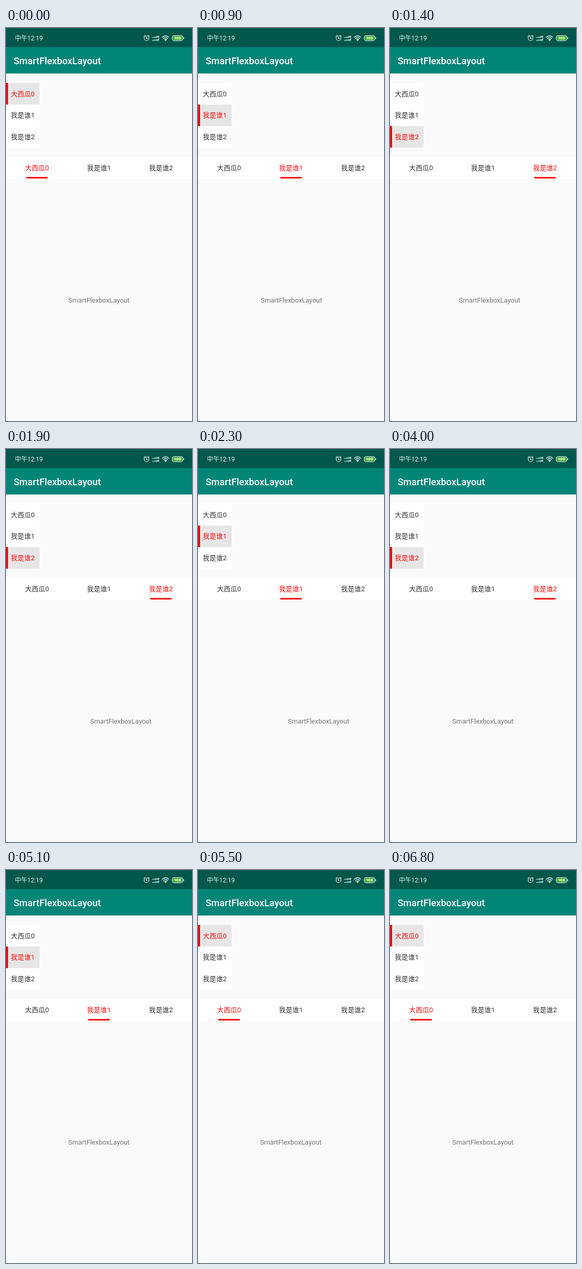
Write an HTML page that moves like this. It is 360 by 760 pixels and loops after 7000 ms.

```html
<!DOCTYPE html>
<html lang="zh-CN">
<head>
<meta charset="utf-8">
<title>SmartFlexboxLayout</title>
<style>
  html, body { margin: 0; width: 100%; height: 100%; overflow: hidden; background: #fafafa; }
  svg { display: block; width: 360px; height: 760px; font: 13px Roboto, "Noto Sans CJK SC", "Noto Sans CJK", sans-serif; }
  .tab { fill: #333; }
  .tab.on { fill: #f81010; }
  .icon { fill: none; stroke: #e8f0ee; stroke-width: 1.2; stroke-linecap: round; }
</style>
</head>
<body>
<svg viewBox="0 0 360 760">
  <rect width="360" height="37" fill="#00574b"/>
  <rect y="37" width="360" height="51" fill="#008577"/>
  <text x="17.3" y="24.3" font-size="12" fill="#e8f0ee">中午12:19</text>
  <text x="14.7" y="70" font-size="18.33" font-weight="500" fill="#fff">SmartFlexboxLayout</text>

  <g class="icon">
    <circle cx="272" cy="20" r="4.5"/>
    <path d="M272 17.5v2.8h2M266.8 16.4l2.3-2.1M277.2 16.4l-2.3-2.1"/>
    <path id="signal" stroke-width="1.7" stroke-linecap="butt"/>
    <path d="M302.6 17.8q6.2-5.6 12.4 0M304.7 20.3q4.1-3.6 8.2 0M306.8 22.6q2-1.7 4 0" stroke-width="1.5"/>
    <rect x="321.6" y="14.6" width="20.8" height="10" rx="4"/>
    <path d="M344 18.3v2.6"/>
  </g>
  <circle cx="308.8" cy="24.1" r="1.1" fill="#e8f0ee"/>
  <rect x="323" y="16" width="18" height="7.2" rx="2.6" fill="#55c030"/>
  <text x="332" y="22.3" font-size="7.5" font-weight="700" text-anchor="middle" fill="#fff">100</text>

  <rect y="106.3" width="65" height="125" fill="#fff"/>
  <rect y="249" width="360" height="43" fill="#fff"/>
  <g id="rowMark">
    <rect y="106.3" width="65" height="41.7" fill="#e6e6e6"/>
    <rect y="106.3" width="4" height="41.7" fill="#f00"/>
  </g>
  <rect id="underline" x="39" y="288" width="42" height="3" rx="1.5" fill="#f00"/>
  <g id="tabs"></g>
  <g id="pages" fill="#757575" text-anchor="middle"></g>
</svg>
<script>
const LOOP = 7000, STEP = 100, WIDTH = 360, ROW = 41.7;
const DRAGGED = 0.165, SETTLE = 450;
const labels = ['大西瓜0', '我是谁1', '我是谁2'];

// Finger down, finger up, from page, to page
const swipes = [
  [370, 590, 0, 1],
  [1040, 1190, 1, 2],
  [1850, 1920, 2, 1],
  [2210, 2310, 1, 0],
  [3320, 3400, 0, 1],
  [3520, 3600, 1, 2],
  [4580, 4690, 2, 1],
  [5110, 5170, 1, 0],
];

const $ = id => document.getElementById(id);
const addText = (parent, content, attrs) => {
  const el = document.createElementNS('http://www.w3.org/2000/svg', 'text');
  for (const name in attrs) el.setAttribute(name, attrs[name]);
  el.textContent = content;
  parent.append(el);
  return el;
};
const move = (el, x, y) => el.setAttribute('transform', `translate(${x} ${y})`);

const tabs = labels.map((label, i) => [
  addText($('tabs'), label, { x: 9.3, y: 131.6 + ROW * i }),
  addText($('tabs'), label, { x: 60 + 120 * i, y: 275, 'text-anchor': 'middle' }),
]);
labels.forEach((_, i) => addText($('pages'), 'SmartFlexboxLayout', { x: 180 + WIDTH * i, y: 531 }));

let bars = '';
for (let i = 0; i < 5; i++) {
  const x = 284.2 + 2.8 * i;
  bars += `M${x} 19v${-1.6 - 0.6 * i}M${x} 24.8v${-1.6 - 0.6 * i}`;
}
$('signal').setAttribute('d', bars);

// The page follows the finger, then settles with a quintic ease-out;
// the tab is selected when the finger lifts.
function stateAt(time) {
  let page = 0, selected = 0;
  for (const [down, up, from, to] of swipes) {
    if (time < down) break;
    let progress = DRAGGED * (time - down) / (up - down);
    if (time >= up) {
      const left = Math.max(0, 1 - (time - up) / SETTLE);
      progress = 1 - (1 - DRAGGED) * left ** 5;
      selected = to;
    }
    page = from + (to - from) * progress;
  }
  return { page, selected };
}

function draw(now) {
  const time = Math.floor((now % LOOP) / STEP) * STEP;
  const { page, selected } = stateAt(time);
  move($('pages'), -page * WIDTH, 0);
  move($('rowMark'), 0, selected * ROW);
  move($('underline'), selected * 120, 0);
  tabs.forEach((pair, i) => pair.forEach(el =>
    el.setAttribute('class', i === selected ? 'tab on' : 'tab')));
}

let start;
function tick(now) {
  start ??= now;
  draw(now - start);
  requestAnimationFrame(tick);
}
draw(0);
requestAnimationFrame(tick);
</script>
</body>
</html>
```
